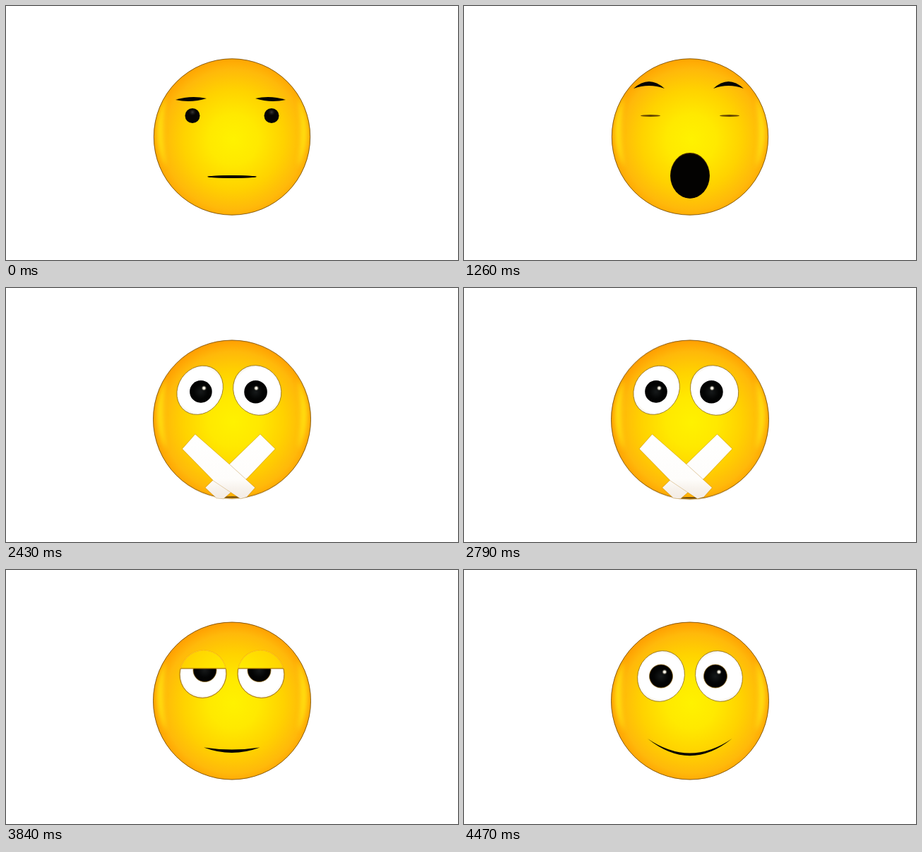
Animation of 640 by 360 pixels, one loop 4500 ms. Source, as an HTML page with a canvas:

```html
<!DOCTYPE html>
<html lang="en">
<head>
<meta charset="utf-8">
<title>Emoji faces</title>
<style>
  html, body { margin: 0; width: 100%; height: 100%; overflow: hidden; background: #fff; }
  canvas { display: block; width: 640px; height: 360px; }
</style>
</head>
<body>
<canvas id="stage" width="640" height="360"></canvas>
<script>
const LOOP = 4500, TAPED = 1680, SMUG = 3330;
const INK = '#060504';
const stage = document.getElementById('stage').getContext('2d');
let g = stage;

const mix = (a, b, k) => a + (b - a) * k;

// Eased value at time t through [time, value] keys.
function key(t, ...keys) {
  if (t <= keys[0][0]) return keys[0][1];
  for (let i = 1; i < keys.length; i++) {
    const [t0, a] = keys[i - 1], [t1, b] = keys[i];
    if (t < t1) {
      const k = (t - t0) / (t1 - t0);
      return mix(a, b, k * k * (3 - 2 * k));
    }
  }
  return keys[keys.length - 1][1];
}

function radial(x, y, r, ...colors) {
  const grad = g.createRadialGradient(x, y, 0, x, y, r);
  colors.forEach(([at, color]) => grad.addColorStop(at, color));
  return grad;
}

function oval(x, y, rx, ry, fill, line, width = 1, turn = 0) {
  g.beginPath();
  g.ellipse(x, y, Math.max(rx, 0.1), Math.max(ry, 0.1), turn, 0, Math.PI * 2);
  if (fill) { g.fillStyle = fill; g.fill(); }
  if (line) { g.strokeStyle = line; g.lineWidth = width; g.stroke(); }
}

// Pointed shape between two ends; top and bottom are the sags of its edges.
function lens(x0, y0, x1, y1, top, bottom, fill = INK) {
  const mx = (x0 + x1) / 2, my = (y0 + y1) / 2;
  g.beginPath();
  g.moveTo(x0, y0);
  g.quadraticCurveTo(mx, my + 2 * top, x1, y1);
  g.quadraticCurveTo(mx, my + 2 * bottom, x0, y0);
  g.fillStyle = fill;
  g.fill();
}

function poly(fill, line, ...points) {
  g.beginPath();
  points.forEach(([x, y]) => g.lineTo(x, y));
  g.closePath();
  g.lineJoin = 'round';
  g.strokeStyle = line;
  g.lineWidth = 1.4;
  g.stroke();
  g.fillStyle = fill;
  g.fill();
}

function makeHead(r, rim) {
  const canvas = document.createElement('canvas');
  canvas.width = 640;
  canvas.height = 360;
  g = canvas.getContext('2d');
  const skin = radial(322, 189, 118, [0, '#fff200'], [0.3, '#ffe900'],
    [0.6, '#ffd200'], [0.84, '#ffb90a'], [1, rim]);
  oval(320, 185.5, r, r, skin);
  g.save();
  g.clip();
  g.filter = 'blur(3px)';
  g.fillStyle = '#ffe010';
  for (const side of [1, -1]) {
    g.beginPath();
    g.ellipse(320, 178, 106, 106, side > 0 ? 0 : Math.PI, -0.5, 0.5);
    g.quadraticCurveTo(320 + side * 102, 178, 320 + side * 93, 178 - side * 51);
    g.fill();
  }
  g.restore();
  oval(320, 185.5, r - 0.3, r - 0.3, null, 'rgba(95,65,15,.75)');
  g = stage;
  return canvas;
}

const heads = [makeHead(111, '#ffa000'), makeHead(111.8, '#ff9a00')];

function surprised(t) {
  g.drawImage(heads[0], 0, 0);
  const open = key(t, [240, 0], [630, 1], [1400, 1], [1660, 0]);
  const extra = key(t, [690, 0], [1260, 1], [1400, 1], [1600, 0]);
  const shut = key(t, [1140, 0], [1245, 1], [1290, 1], [1400, 0]);

  const browY = mix(132, 119 - 2 * extra, open);
  const tilt = 1 - open;
  const top = mix(-3, -10, open), bottom = mix(3, -5 + extra, open);
  lens(240, browY + tilt, 284, browY - tilt, top, bottom);
  lens(353, browY - tilt, 396, browY + tilt, top, bottom);

  const rx = mix(mix(10.5, 13, open), 14, shut);
  const ry = mix(mix(10.5, 17.5, open), 1.4, shut);
  for (const x of [264, 376]) {
    oval(x, 155.5, rx, ry, shut > 0.9 ? '#654600' : INK);
    if (shut < 0.5) {
      const y = 155.5 - ry * 0.48;
      oval(x, y, rx * 0.6, ry * 0.4, radial(x, y, rx * 0.6, [0, '#3c3a38'], [1, 'rgba(6,5,4,0)']));
    }
  }

  const my = mix(242, 240.3, open);
  const mx = mix(35, 27 + extra, open), mh = mix(1.9, 31 + 1.4 * extra, open);
  oval(320, my, mx, mh, '#3a2000');
  oval(320, my + 0.7 * open, mx - 0.6, mh - 0.8 * open, '#030201');
}

function pupil(x, y, r, gx, gy, ring) {
  oval(x, y, r, r, radial(x, y, r, [0, '#16191a'], [0.6, '#040505'], [1, '#000']), ring, 0.8);
  oval(x + gx, y + gy, 4, 4, radial(x + gx, y + gy, 4, [0, '#fff'], [0.4, '#eee8d8'], [1, 'rgba(60,60,50,0)']));
}

// Eyeball with a lid covering the part above the height lid (0 open, 1 shut).
function eye(x, y, rx, ry, turn, lid, drawPupil) {
  const r = ry + 1, edge = y - r + 2 * r * lid;
  const white = radial(x, y, r, [0, '#fff'], [0.86, '#fff'], [1, '#f1ead8']);
  oval(x, y, rx, ry, white, null, 0, turn);
  g.save();
  g.clip();
  drawPupil();
  if (lid > 0) {
    g.fillStyle = radial(322, 172, 112, [0, '#fff000'], [0.35, '#ffe900'], [0.65, '#ffd700'], [1, '#ffb600']);
    g.fillRect(x - r, y - r, 2 * r, edge - y + r);
    if (lid < 0.97) {
      g.fillStyle = 'rgba(150,95,0,.65)';
      g.fillRect(x - r, edge - 1, 2 * r, 1.6);
    }
  }
  g.restore();
  g.save();
  if (lid > 0) {
    oval(x, y, rx, ry, null, 'rgba(245,155,0,.4)', 1.3, turn);
    g.beginPath();
    g.rect(x - r - 2, edge, 2 * r + 4, 2 * r);
    g.clip();
  }
  oval(x, y, rx, ry, null, 'rgba(130,95,15,.75)', 1, turn);
  g.restore();
}

function tape(x, y) {
  g.save();
  g.translate(x, y);
  const edge = 'rgba(190,140,50,.5)';
  const shade = g.createLinearGradient(0, 205, 0, 299);
  shade.addColorStop(0, '#fff');
  shade.addColorStop(0.7, '#fefdfb');
  shade.addColorStop(0.85, '#f7f2ec');
  shade.addColorStop(1, '#f3ebe4');
  poly(shade, edge, [359, 207.5], [380, 228], [341, 269], [307, 298.5], [297, 297.5], [281.5, 283]);
  poly(shade, edge, [267, 207.5], [313, 248], [351.5, 283], [340, 296], [331, 298.5], [293, 273], [249, 228]);
  g.restore();
}

function taped(t) {
  const sway = Math.cos(Math.PI * (t - 2040) / 750);
  const lid = key(t, [1880, 0], [1990, 1], [2070, 1], [2190, 0], [2980, 0], [3070, 1], [3110, 1], [3210, 0]);
  // The chin drops a little as the head turns.
  const stretch = 1 + 0.005 * (1 - sway);
  g.drawImage(heads[1], 0, 74 * (1 - stretch), 640, 360 * stretch);
  const chin = 74 + 222.5 * stretch;
  lens(300, chin - 2, 342, chin - 2, -0.3, 1.4, '#4a3514');

  const lx = 274.8 + 2.2 * sway, rx = 355.8 + 1.2 * sway;
  eye(lx, 144.8, 31, 36.2, 0.6, lid, () => pupil(lx + 1.4 + 2 * sway, 146.9, 15.8, 4.4, -5));
  eye(rx, 145, 33, 36.4, -0.6, lid, () => pupil(rx - 2 + 2.2 * sway, 147.3, 16.3, 0.8, -5.3));
  tape(1 + 1.5 * sway, 0);
}

function smug(t) {
  g.drawImage(heads[1], 0, 0);
  const up = key(t, [3870, 0], [4290, 1]);
  const ey = mix(147.5, 150.5, up), ry = mix(34, 36.5, up);
  const lid = mix(0.39, 0, up);
  const px = mix(281.5, 279, up), py = mix(142, 150.5, up);
  const ring = '#8c6512';
  eye(279, ey, 32.8, ry, 0.4, lid, () => pupil(px, py, 16.5, 5, -6, ring));
  eye(361, ey, 32.8, ry, -0.4, lid, () => pupil(px + 77, py, 16.5, 5, -6, ring));

  const y = mix(251.5, 239, up);
  lens(mix(280, 260, up), y, mix(359.5, 379.5, up), y, mix(3, 20.5, up), mix(7.5, 24.2, up));
}

function draw() {
  const t = performance.now() % LOOP;
  g.fillStyle = '#fff';
  g.fillRect(0, 0, 640, 360);
  (t < TAPED ? surprised : t < SMUG ? taped : smug)(t);
  requestAnimationFrame(draw);
}
draw();
</script>
</body>
</html>
```
